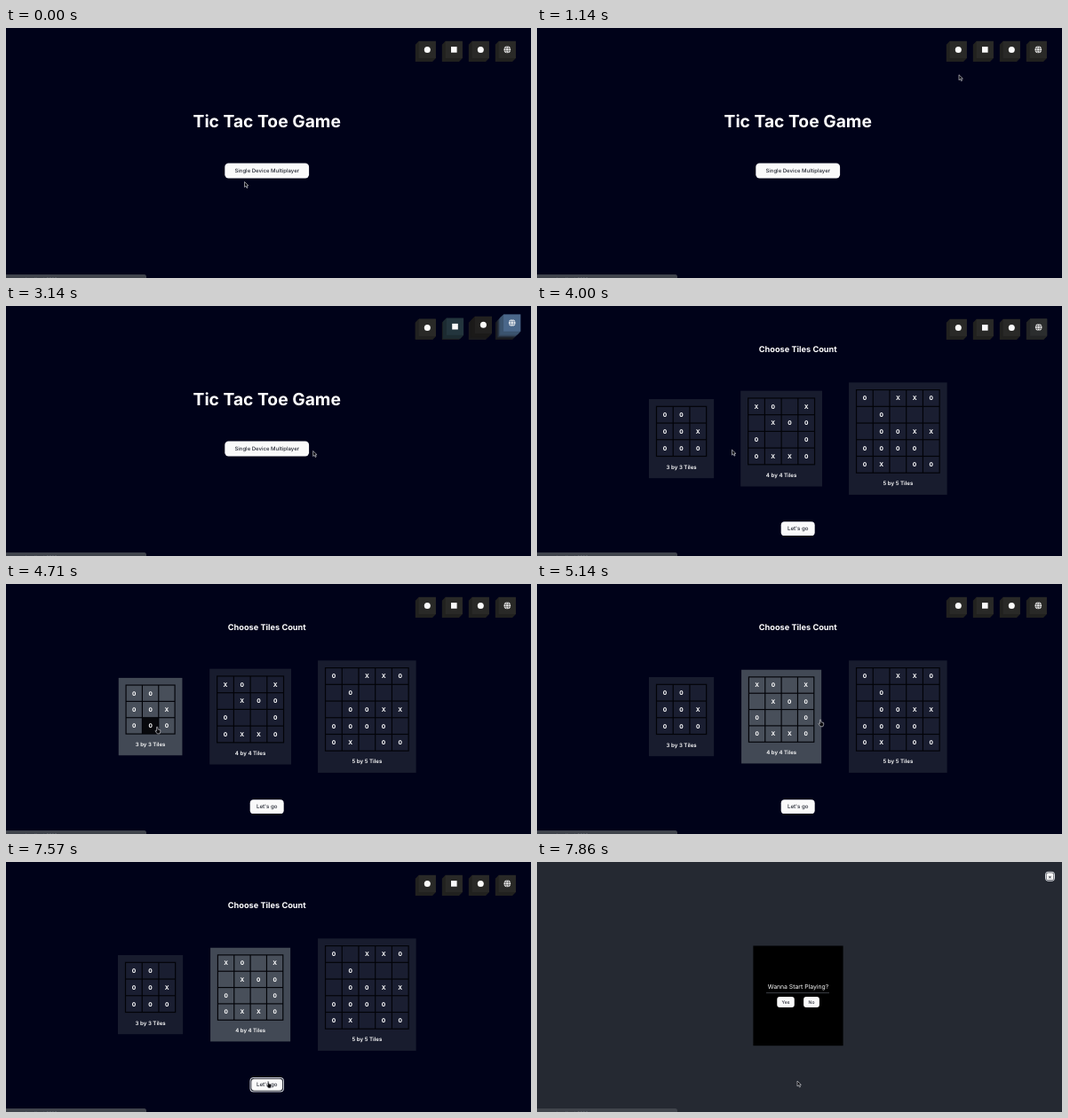
An HTML page with a canvas that plays this animation: 591x282 px, repeating every 8000 ms.

```html
<!DOCTYPE html>
<html lang="en">
<head>
<meta charset="utf-8">
<title>Tic Tac Toe Game</title>
<style>
html, body { margin: 0; width: 100%; height: 100%; overflow: hidden; background: #000219; }
canvas { display: block; }
</style>
</head>
<body>
<canvas id="stage" width="591" height="282"></canvas>
<script>
const ctx = document.getElementById('stage').getContext('2d');
const W = 591, H = 282, MID = 293.7, LOOP = 8000, STEP = 1000 / 7;
const BG = '#000219', WHITE = '#fafafa', INK = '#242833';
const PAGE_TILES = 3850, PICKED = 5850, FOCUSED = 7565, MODAL = 7710;

// Pointer stops: time, x, y
const STOPS = [
  [0, 268.5, 173.5], [1140, 475, 53], [1430, 474, 30], [2140, 519.5, 26],
  [2850, 562, 28], [3140, 346.5, 163.5], [3430, 262, 163], [4710, 166.5, 161],
  [5290, 368, 150], [5710, 282.5, 147], [6290, 274.5, 176], [6430, 274.5, 176],
  [7140, 293, 247]
];

const SOCIAL = [
  { hue: [0, 165, 235], mark: 'disc' },
  { hue: [0, 119, 181], mark: 'square' },
  { hue: [23, 21, 21], mark: 'disc' },
  { hue: [88, 130, 180], mark: 'globe' }
];
const DARK = [41, 41, 39], FACE = 19.25, SIDE = 3.85, RISE = 7.7;

// Cards grow with their grid and stand in a row.
const PITCH = 18.72, GAP = 30;
let left = 126;
const CARDS = [
  ['00 ', '00X', '000'],
  ['X0 X', ' X00', '0  0', '0XX0'],
  ['0 XX0', ' 0   ', ' 00XX', '0000 ', '0X 00']
].map(rows => {
  const grid = rows.length * PITCH, w = grid + 17, h = grid + 33;
  const card = { rows, grid, x: left, y: 149.6 - h / 2, w, h };
  left += w + GAP;
  return card;
});

const clamp = v => Math.min(1, Math.max(0, v));
const inside = (px, py, x, y, w, h) => px >= x && px < x + w && py >= y && py < y + h;
const rgb = (c, k = 1) => `rgb(${c.map(v => Math.round(v * k)).join(',')})`;

function pointerAt(t) {
  const i = STOPS.findIndex(s => s[0] > t);
  if (i < 0) return STOPS[STOPS.length - 1].slice(1);
  const [t0, x0, y0] = STOPS[i - 1], [t1, x1, y1] = STOPS[i];
  const u = (t - t0) / (t1 - t0);
  return [x0 + (x1 - x0) * u, y0 + (y1 - y0) * u];
}

// The pointer sweeps the icons left to right; each rises fast and sinks slowly.
function lift(i, t) {
  const enter = 1530 + 330 * i, leave = enter + 330;
  return t < leave ? clamp((t - enter) / 250) : clamp(1 - (t - leave) / 1300) ** 1.4;
}

function text(s, x, y, size, weight, color) {
  ctx.font = `${weight} ${size}px Inter, sans-serif`;
  ctx.textAlign = 'center';
  ctx.fillStyle = color;
  ctx.fillText(s, x, y + size * .364);
}

function rect(x, y, w, h, color) {
  ctx.fillStyle = color;
  ctx.fillRect(x, y, w, h);
}

function rounded(x, y, w, h, r, color) {
  ctx.fillStyle = color;
  ctx.beginPath();
  ctx.roundRect(x, y, w, h, r);
  ctx.fill();
}

function button(label, x, y, w, h, size) {
  rounded(x - w / 2, y - h / 2, w, h, h / 4, WHITE);
  text(label, x, y, size, 500, INK);
}

function focusRing(x, y, w, h) {
  rounded(x - w / 2, y - h / 2, w, h, 4, '#d5d8de');
  rounded(x - w / 2 + 1, y - h / 2 + 1, w - 2, h - 2, 3, '#10131f');
}

function disc(x, y, r, color) {
  rounded(x - r, y - r, 2 * r, 2 * r, r, color);
}

// A square face with a slanted side to the left and below
function block(x, y, color) {
  const l = x - FACE / 2, r = l + FACE, top = y - FACE / 2, low = top + FACE;
  ctx.fillStyle = rgb(color, .8);
  ctx.beginPath();
  ctx.moveTo(l, top);
  ctx.lineTo(l - SIDE, top + SIDE);
  ctx.lineTo(l - SIDE, low + SIDE);
  ctx.lineTo(r - SIDE, low + SIDE);
  ctx.lineTo(r, low);
  ctx.fill();
  rect(l, top, FACE, FACE, rgb(color));
}

function globe(x, y, line) {
  disc(x, y, 3.8, WHITE);
  ctx.strokeStyle = line;
  ctx.lineWidth = .6;
  ctx.beginPath();
  ctx.ellipse(x, y, 1.7, 3.8, 0, 0, 7);
  for (const d of [-1.3, 1.3]) {
    ctx.moveTo(x - 4, y + d);
    ctx.lineTo(x + 4, y + d);
  }
  ctx.stroke();
}

function social(t) {
  SOCIAL.forEach(({ hue, mark }, i) => {
    const x = 474.3 + 30 * i, y = 24.4, p = lift(i, t), rise = RISE * p;
    const color = DARK.map((v, c) => v + (hue[c] - v) * p);
    ctx.globalAlpha = 1 - .35 * p;
    block(x, y, DARK);
    for (let k = 1; p > 0 && k <= 4; k++) {
      ctx.globalAlpha = (k / 4) ** 1.5;
      block(x + rise * k / 4, y - rise * k / 4, color);
    }
    ctx.globalAlpha = 1;
    const mx = x + rise, my = y - rise;
    if (mark === 'globe') globe(mx, my, rgb(color));
    else if (mark === 'disc') disc(mx, my, 3.5, WHITE);
    else rect(mx - 3.3, my - 3.3, 6.6, 6.6, WHITE);
  });
}

function home() {
  text('Tic Tac Toe Game', MID, 105, 19.25, 700, '#fff');
  button('Single Device Multiplayer', MID, 161, 94.8, 16.8, 6);
}

function card({ rows, grid, x, y, w, h }, active, fx, fy) {
  const n = rows.length, cx = x + w / 2, cy = y + h / 2, gx = x + 8.5, gy = y + 8.3;
  ctx.save();
  if (active) {
    ctx.translate(cx, cy);
    ctx.scale(.98, .98);
    ctx.translate(-cx, -cy);
  }
  rect(x, y, w, h, active ? '#424955' : '#181c2e');
  rect(gx - .6, gy - .6, grid + 1.2, grid + 1.2, '#020308');
  rows.forEach((row, j) => [...row].forEach((mark, i) => {
    const tx = gx + i * PITCH, ty = gy + j * PITCH;
    const over = inside(fx, fy, tx, ty, PITCH, PITCH);
    rect(tx + .6, ty + .6, PITCH - 1.2, PITCH - 1.2, over ? '#08090d' : active ? '#484f5a' : '#1a1e31');
    if (mark !== ' ') text(mark, tx + PITCH / 2, ty + PITCH / 2, 6.6, 700, '#fff');
  }));
  text(`${n} by ${n} Tiles`, cx, y + h - 12.7, 6.16, 600, '#fff');
  ctx.restore();
}

function tiles(t, x, y) {
  text('Choose Tiles Count', MID, 48.5, 9.23, 700, '#fff');
  CARDS.forEach((c, i) => {
    const over = inside(x, y, c.x, c.y, c.w, c.h);
    card(c, over || (i === 1 && t >= PICKED), x + 2, y);
  });
  const focused = t >= FOCUSED;
  if (focused) focusRing(MID, 251.2, 38.4, 16.6);
  button("Let's go", MID, 251.2, focused ? 34.8 : 38, focused ? 13 : 15.8, 6.16);
}

function modal(alpha) {
  ctx.globalAlpha = alpha;
  rect(0, 0, W, H, '#252932');
  rect(243.4, 94.5, 101.2, 112.7, '#000');
  text('Wanna Start Playing?', 294, 141, 6.85, 400, '#fff');
  rect(258, 147.3, 71, .8, '#4a4e56');
  button('Yes', 280, 158, 19.5, 12, 5.1);
  button('No', 309, 158, 17.8, 12, 5.1);
  focusRing(577.5, 16.2, 11, 11);
  button('×', 577.5, 16.2, 8, 8, 6.5);
  ctx.globalAlpha = 1;
}

function statusBar() {
  ctx.save();
  ctx.beginPath();
  ctx.roundRect(-4, 278, 162, 10, 2.5);
  ctx.clip();
  rect(0, 278, 158, 4, '#40444c');
  text('localhost:3000', 40, 283, 5, 400, '#7c8087');
  ctx.restore();
}

const ARROW = new Path2D('M0 0V6L1.5 4.7 2.5 7 3.5 6.6 2.6 4.3H4.4Z');
const HAND = new Path2D('M1.6 .4H2.8L3 3 5.8 3.8V5.8L5 8H2.3L0 5 .6 4.2 1.6 5Z');

function pointer(x, y, hand) {
  const shape = hand ? HAND : ARROW;
  ctx.save();
  ctx.translate(x, y);
  ctx.fillStyle = '#0a0a0e';
  ctx.strokeStyle = '#c4c6cc';
  ctx.lineWidth = .7;
  ctx.fill(shape);
  ctx.stroke(shape);
  ctx.restore();
}

function clickable(t, x, y) {
  if (t >= MODAL) return false;
  if (inside(x, y, 461, 8, 114, 31)) return true;
  if (t < PAGE_TILES) return inside(x, y, 247, 153, 94, 16);
  return inside(x, y, 275, 243, 38, 16) || CARDS.some(c => inside(x, y, c.x, c.y, c.w, c.h));
}

function draw(t) {
  const [x, y] = pointerAt(t);
  rect(0, 0, W, H, BG);
  if (t < PAGE_TILES) home();
  else tiles(t, x, y);
  social(t);
  if (t >= MODAL) modal(t < MODAL + STEP ? .6 : 1);
  statusBar();
  pointer(x, y, clickable(t, x, y));
}

// The screen refreshes seven times a second.
function tick() {
  const now = performance.now() % LOOP;
  draw(Math.floor((now + 6) / STEP) * STEP % LOOP);
  requestAnimationFrame(tick);
}

ctx.textRendering = 'geometricPrecision';
tick();
</script>
</body>
</html>
```
